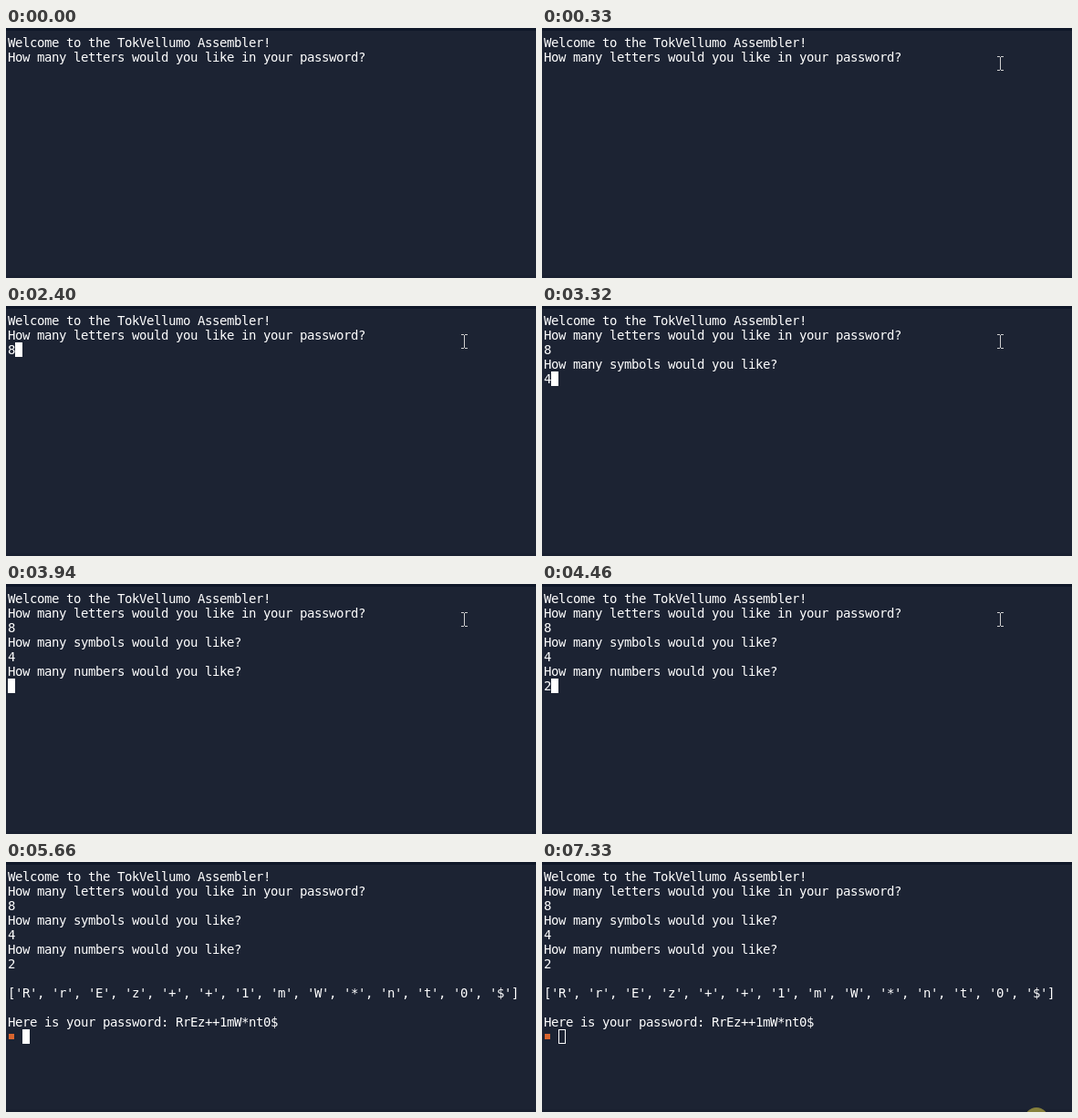
Recreate the animation shown at these times as an HTML page with a canvas. Size 581 px wide and 275 px high, loop 7.39 s.

```html
<!DOCTYPE html>
<html lang="en">
<head>
<meta charset="utf-8">
<title>Password terminal</title>
<style>
  html, body { margin: 0; width: 100%; height: 100%; overflow: hidden; background: #1c2333; }
  canvas { display: block; }
</style>
</head>
<body>
<canvas id="stage" width="581" height="275"></canvas>
<script>
const ctx = document.getElementById('stage').getContext('2d');
const LOOP = 7390;
const CELL = 8, ROW = 16, LEFT = 2, TOP = 8;
const REST = { x: 502, y: 39 };

const password = 'RrEz++1mW*nt0$';
const list = '[' + [...password].map(c => `'${c}'`).join(', ') + ']';

// Each line: time it appears, row, text
const lines = [
  [0, 0, 'Welcome to the TokVellumo Assembler!'],
  [0, 1, 'How many letters would you like in your password?'],
  [2400, 2, '8'],
  [2600, 3, 'How many symbols would you like?'],
  [3320, 4, '4'],
  [3940, 5, 'How many numbers would you like?'],
  [4460, 6, '2'],
  [4940, 8, list],
  [4940, 10, 'Here is your password: ' + password]
];

// Block cursor: time, column, row
const caret = [
  [470, 0, 2], [2400, 1, 2], [2600, 0, 4], [3320, 1, 4],
  [3940, 0, 6], [4460, 1, 6], [4940, 2, 11]
];

function rect(x, y, w, h, color) {
  ctx.fillStyle = color;
  ctx.fillRect(x, y, w, h);
}

function print(row, text) {
  ctx.fillStyle = '#fff';
  [...text].forEach((c, i) => ctx.fillText(c, LEFT + i * CELL, TOP + row * ROW + 13));
}

function drawCaret(t) {
  const now = caret.filter(c => t >= c[0]).pop();
  if (!now) return;
  const x = LEFT + now[1] * CELL, y = TOP + now[2] * ROW;
  if (t < 7330) {
    rect(x, y, CELL, ROW, '#fff');
  } else {
    ctx.strokeStyle = '#fff';
    ctx.lineWidth = 1;
    ctx.strokeRect(x + 0.5, y + 0.5, CELL - 1, ROW - 1);
  }
}

function clickSpot(x, y) {
  ctx.fillStyle = '#86803c';
  ctx.beginPath();
  ctx.arc(x, y, 13, 0, Math.PI * 2);
  ctx.fill();
}

// The pointer is sampled in steps of about 65 ms
function pointer(t) {
  if (t < 70 || t >= 5660) return null;
  if (t < 330) {
    const p = Math.floor((t - 70) / 65) / 4;
    const left = (1 - p) ** 2;
    return { x: REST.x + 27 * left, y: REST.y + 222 * left };
  }
  if (t < 5340) return REST;
  const p = (Math.floor((t - 5340) / 64) + 1) / 5;
  return { x: REST.x + 25 * p * p, y: REST.y + 189 * p * p };
}

function drawPointer(t) {
  const at = pointer(t);
  if (!at) return;
  const x = Math.round(at.x), y = Math.round(at.y);
  const color = '#d0d0d0';
  for (const dy of [-8, 7]) {
    rect(x - 3, y + dy, 3, 1, color);
    rect(x + 1, y + dy, 3, 1, color);
  }
  rect(x, y - 7, 1, 14, color);
}

function draw(t) {
  rect(0, 0, 581, 275, '#1c2333');
  rect(0, 0, 581, 3, '#0f1728');
  rect(0, 272, 581, 3, '#192030');
  ctx.font = '14px "DejaVu Sans Mono", monospace';
  ctx.textBaseline = 'alphabetic';
  for (const [start, row, text] of lines) {
    if (t >= start) print(row, text);
  }
  if (t >= 4940) rect(3, 189, 6, 6, '#d9652e');
  drawCaret(t);
  if (t >= 470 && t < 530) clickSpot(499, 39);
  if (t >= 7330) clickSpot(542, 283);
  drawPointer(t);
}

const begin = performance.now();
function frame() {
  draw((performance.now() - begin) % LOOP);
  requestAnimationFrame(frame);
}
draw(0);
requestAnimationFrame(frame);
</script>
</body>
</html>
```
